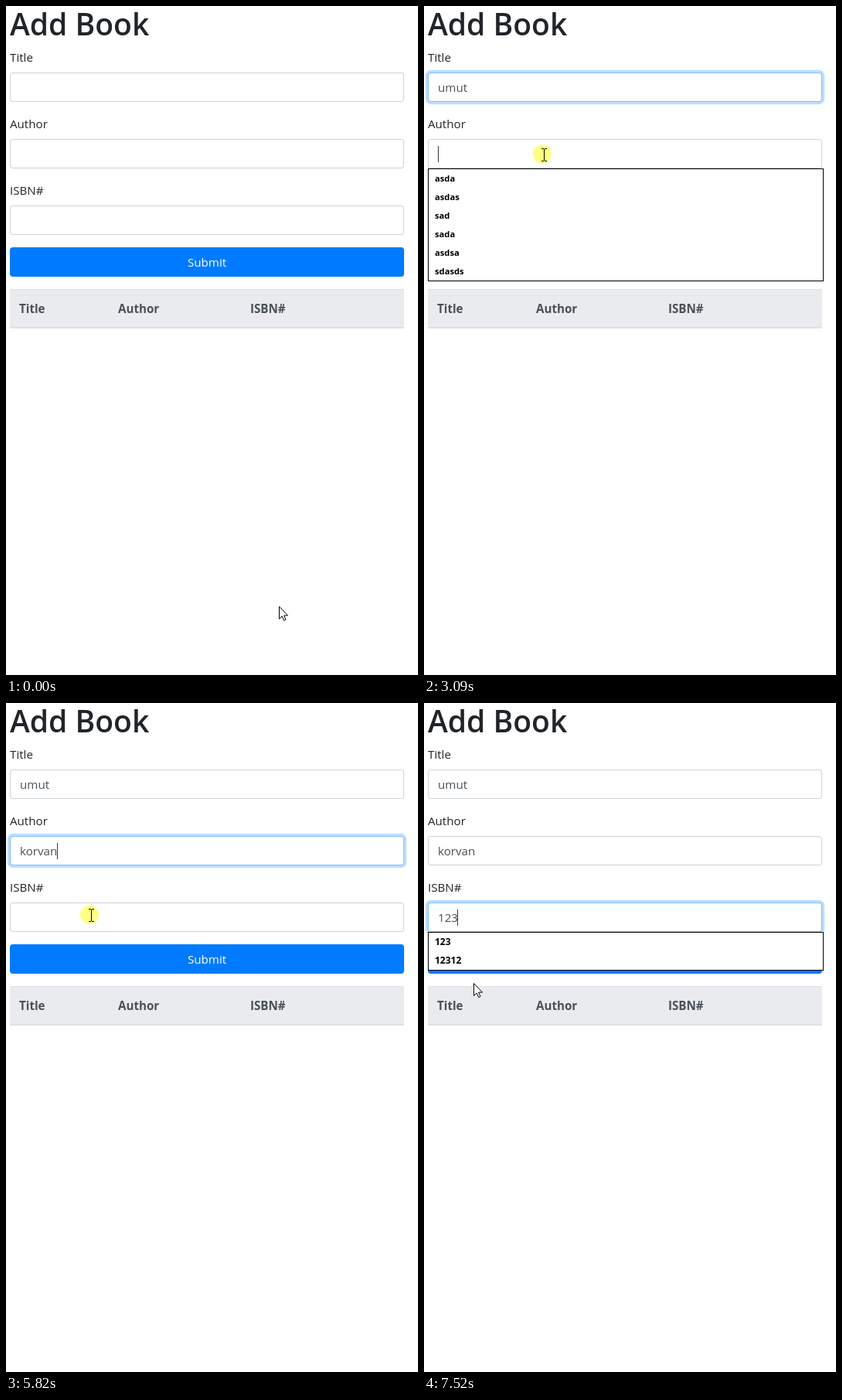
These frames come from a looping animation (533x865 px, 8 s). An HTML page with a canvas:

```html
<!DOCTYPE html>
<html lang="en">
<head>
<meta charset="utf-8">
<title>Add Book</title>
<style>
  html, body { margin: 0; width: 100%; height: 100%; overflow: hidden; background: #fff; }
  canvas { display: block; }
</style>
</head>
<body>
<canvas id="stage" width="533" height="865"></canvas>
<script>
const ctx = document.getElementById('stage').getContext('2d');
const LOOP = 8000, BLINK = 530, FADE = 150, LEFT = 5, WIDTH = 510, ROW = 24;
const BODY = '15.15px "Open Sans", "Noto Sans", sans-serif';
const BOLD = 'bold ' + BODY;
const HEADING = '600 39px "Open Sans", "Noto Sans", sans-serif';
const WORDS = ['asda', 'asdas', 'sad', 'sada', 'asdsa', 'sdasds'];
const NUMBERS = ['123', '12312', '12412', '2323', '3213', '4124'];

// keys: [time, characters typed so far]
const fields = [
  { label: 'Title', top: 86, text: 'umut', focus: 610, blur: 3090, menu: WORDS, menuSize: 11.2,
    keys: [[1300, 1], [1700, 2], [1780, 4]] },
  { label: 'Author', top: 172, text: 'korvan', focus: 3090, blur: 5830, menu: WORDS, menuSize: 11.2,
    keys: [[4040, 2], [4190, 3], [4420, 4], [4500, 5], [4570, 6]] },
  { label: 'ISBN#', top: 258, text: '123', focus: 5830, blur: Infinity, menu: NUMBERS, menuSize: 12,
    keys: [[6140, 1], [6220, 2], [6450, 3]] }
];

const moves = [
  { start: 70, end: 360, steps: 5, to: [60, 109] },
  { start: 2480, end: 2950, steps: 7, to: [155, 192] },
  { start: 5440, end: 5680, steps: 4, to: [110, 274] },
  { start: 6680, end: 6760, steps: 2, to: [64, 346] },
  { start: 6840, end: 6990, steps: 3, to: [60, 378] },
  { start: 7060, end: 7290, steps: 4, to: [64, 362] }
];
const presses = [[530, 690], [3010, 3180], [5760, 5910]];

const clamp = v => Math.max(0, Math.min(1, v));
const ease = p => p * p * (3 - 2 * p);

function pointerAt(t) {
  let pos = [353, 776];
  for (const { start, end, steps, to } of moves) {
    if (t < start) break;
    const step = Math.floor((t - start) / (end - start) * (steps - 1)) + 1;
    const p = ease(clamp(step / steps));
    pos = pos.map((v, i) => v + (to[i] - v) * p);
  }
  return pos.map(Math.round);
}

function fieldState(field, t) {
  const typed = field.keys.filter(([time]) => time <= t).pop();
  const value = field.text.slice(0, typed ? typed[1] : 0);
  const active = t >= field.focus && t < field.blur;
  const lastInput = typed ? typed[0] : field.focus;
  return {
    value, active,
    glow: ease(clamp((t - field.focus) / FADE)) * (1 - ease(clamp((t - field.blur) / FADE))),
    caret: active && Math.floor((t - lastInput) / BLINK) % 2 === 0,
    matches: active ? field.menu.filter(item => item.startsWith(value)) : []
  };
}

function text(str, x, y, font, color, align = 'left') {
  ctx.font = font;
  ctx.fillStyle = color;
  ctx.textAlign = align;
  ctx.fillText(str, x, y);
}

function rect(x, y, w, h, color) {
  ctx.fillStyle = color;
  ctx.fillRect(x, y, w, h);
}

function rounded(x, y, w, h, r, color) {
  ctx.beginPath();
  ctx.roundRect(x, y, w, h, r);
  ctx.fillStyle = color;
  ctx.fill();
}

function drawField({ label, top }, { value, glow, caret }) {
  text(label, LEFT, top - 14, BODY, '#212529');
  if (glow > 0) {
    const spread = 3.2 * glow;
    rounded(LEFT - spread, top - spread, WIDTH + 2 * spread, 38 + 2 * spread, 4 + spread,
      `rgba(0,123,255,${0.25 * glow})`);
  }
  const mix = (a, b) => Math.round(a + (b - a) * glow);
  rounded(LEFT, top, WIDTH, 38, 4, `rgb(${mix(206, 128)},${mix(212, 189)},${mix(218, 255)})`);
  rounded(LEFT + 1, top + 1, WIDTH - 2, 36, 3, '#fff');
  text(value, 18, top + 25, BODY, '#495057');
  if (caret) rect(Math.floor(18 + ctx.measureText(value).width), top + 9, 1, 21, '#343a40');
}

function drawMenu({ top, menuSize }, { matches }, pointerY) {
  const y = top + 38, height = matches.length * ROW + 2;
  rect(LEFT, y, 512, height, '#000');
  rect(LEFT + 1, y + 1, 510, height - 2, '#fff');
  const hovered = Math.floor((pointerY - y - 3) / ROW);
  matches.forEach((item, i) => {
    const rowTop = y + 1 + i * ROW;
    if (i === hovered) rect(LEFT + 1, rowTop, 510, ROW, '#bfddf5');
    text(item, 14, rowTop + 16, `bold ${menuSize}px "Open Sans", "Noto Sans", sans-serif`, '#000');
  });
}

function drawTable() {
  rect(LEFT, 366, WIDTH, 51, '#dee2e6');
  rect(LEFT, 367, WIDTH, 48, '#e9ebee');
  [['Title', 17], ['Author', 145], ['ISBN#', 316]].forEach(([name, x]) =>
    text(name, x, 397, BOLD, '#495057'));
}

function drawArrow(x, y) {
  const outline = [[0, 0], [0, 16], [3.7, 12.5], [6.2, 18], [8.5, 17], [6.1, 11.6], [11, 11.6]];
  ctx.beginPath();
  outline.forEach(([dx, dy]) => ctx.lineTo(x + dx + 0.5, y + dy + 0.5));
  ctx.closePath();
  ctx.fillStyle = '#fff';
  ctx.fill();
  ctx.strokeStyle = '#000';
  ctx.lineWidth = 1;
  ctx.stroke();
}

function drawBeam(x, y) {
  rect(x, y - 7, 1, 15, '#000');
  for (const edge of [y - 8, y + 8]) {
    rect(x - 3, edge, 3, 1, '#000');
    rect(x + 1, edge, 3, 1, '#000');
  }
}

function drawPointer(x, y, t) {
  if (presses.some(([from, to]) => t >= from && t < to)) {
    ctx.beginPath();
    ctx.arc(x - 2, y - 0.5, 12, 0, Math.PI * 2);
    ctx.globalCompositeOperation = 'multiply';
    ctx.fillStyle = '#ffff82';
    ctx.fill();
    ctx.globalCompositeOperation = 'source-over';
  }
  const overField = fields.some(({ top }) => y >= top && y < top + 38);
  (overField ? drawBeam : drawArrow)(x, y);
}

function draw(t) {
  const [x, y] = pointerAt(t);
  const states = fields.map(field => fieldState(field, t));
  const menuOpen = states.some(s => s.matches.length);
  rect(0, 0, 533, 865, '#fff');
  text('Add Book', LEFT, 38, HEADING, '#212529');
  fields.forEach((field, i) => drawField(field, states[i]));
  const hover = !menuOpen && y >= 312 && y < 350;
  rounded(LEFT, 312, WIDTH, 38, 4, hover ? '#0069d9' : '#007bff');
  text('Submit', 260, 337, BODY, '#fff', 'center');
  drawTable();
  fields.forEach((field, i) => {
    if (states[i].matches.length) drawMenu(field, states[i], y);
  });
  drawPointer(x, y, t);
}

const began = performance.now();
function tick() {
  draw((performance.now() - began) % LOOP);
  requestAnimationFrame(tick);
}
tick();
</script>
</body>
</html>
```
